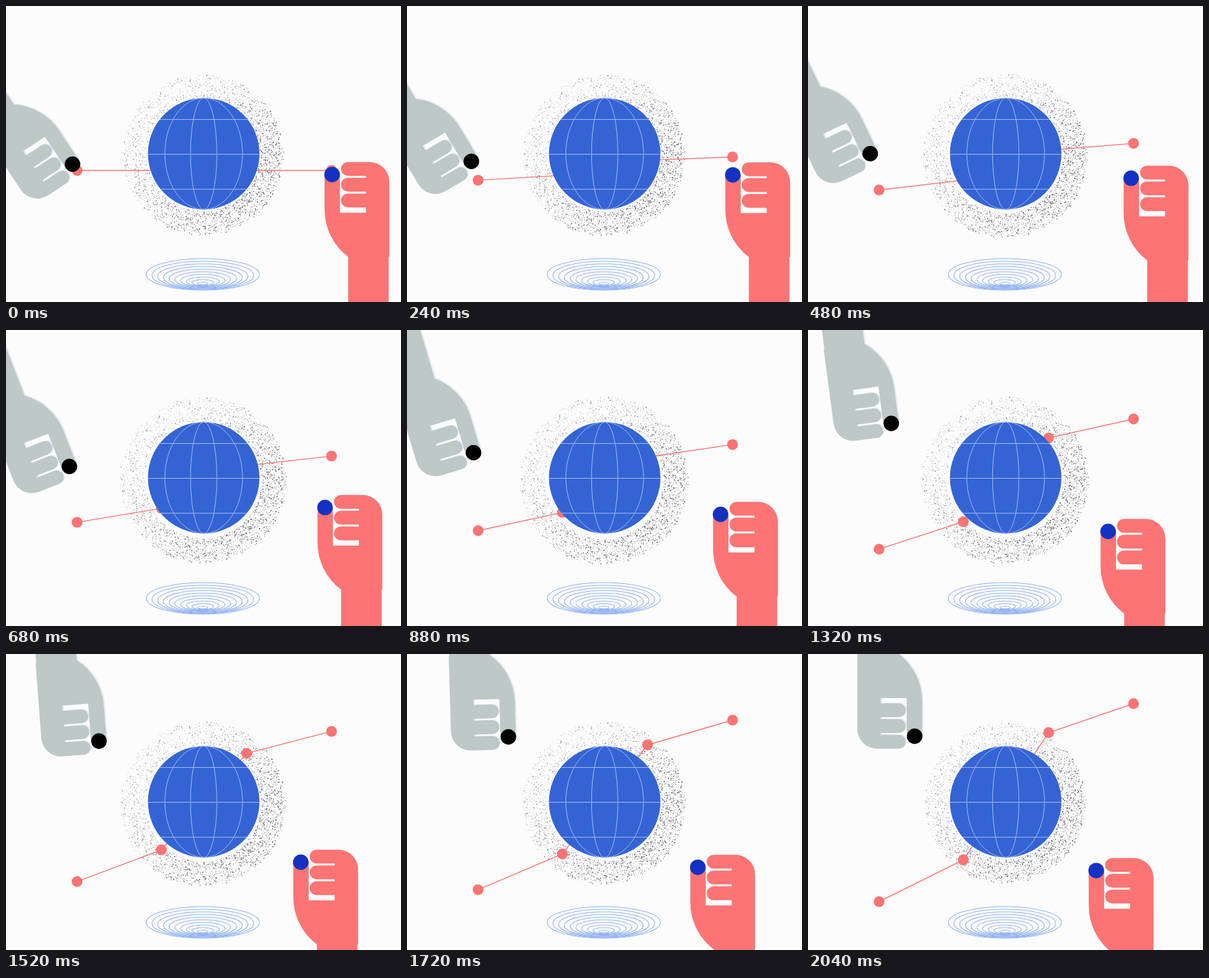
Animation of 600x450 px, one loop 2480 ms. Source, as an HTML page with a canvas:

```html
<!DOCTYPE html>
<html lang="en">
<head>
<meta charset="utf-8">
<title>Globe and hands</title>
<style>
html, body { margin: 0; width: 100%; height: 100%; overflow: hidden; background: #fcfcfc; }
canvas { display: block; }
</style>
</head>
<body>
<canvas id="stage" width="600" height="450"></canvas>
<script>
const ctx = document.getElementById('stage').getContext('2d');
const LOOP = 2480, MOVE = 2040, STEP = 40, DELAY = 140;
const RED = '#fc7474', BLUE = '#3464d4';

// Fist with forearm; the thumb nail is at the origin.
const finger = 'H24a10.5 10.5 0 0 0 0 21H51.5';
const hand = new Path2D(
  'M-11.4 0V53A90 90 0 0 0 24.4 125V420H86V125H87V11A30 30 0 0 0 57-19' +
  finger + 'v3' + finger + 'v3' + finger + 'V58H12V0Z');

// Grey hand poses: time, nail x, nail y, angle in degrees.
const poses = [
  [0, 101, 240.5, -33.4], [480, 94.5, 224.5, -25.6], [880, 101, 186.5, -16.6],
  [1120, 113, 159.5, -11.4], [1320, 126.5, 142, -7.5], [1720, 154, 126, -1.7],
  [2040, 162, 125, 0]
];

let seed = 7;
function rnd() {
  seed = (seed * 16807) % 2147483647;
  return seed / 2147483647;
}

// Dust is densest at the lower right and thin at the upper left.
const dust = [];
while (dust.length < 3000) {
  const a = rnd() * 2 * Math.PI;
  const weight = 0.76 + 0.24 * Math.cos(a - 0.7);
  if (rnd() > weight) continue;
  const r = 122 - 36 * rnd();
  const shade = Math.round(240 - (20 + 95 * rnd()) * weight);
  dust.push({
    x: r * Math.cos(a), y: r * Math.sin(a),
    size: rnd() < 0.28 * weight ? 2 : 1,
    color: `rgb(${shade},${shade},${shade})`
  });
}

function spline(t, col) {
  let i = 0;
  while (i < poses.length - 2 && t > poses[i + 1][0]) i++;
  const slope = k => k === 0 || k === poses.length - 1 ? 0 :
    (poses[k + 1][col] - poses[k - 1][col]) / (poses[k + 1][0] - poses[k - 1][0]);
  const [p, q] = [poses[i], poses[i + 1]];
  const d = q[0] - p[0], s = (t - p[0]) / d, s2 = s * s, s3 = s2 * s;
  return (2 * s3 - 3 * s2 + 1) * p[col] + (s3 - 2 * s2 + s) * d * slope(i) +
    (3 * s2 - 2 * s3) * q[col] + (s3 - s2) * d * slope(i + 1);
}

function disc(x, y, r, color) {
  ctx.fillStyle = color;
  ctx.beginPath();
  ctx.arc(x, y, r, 0, 2 * Math.PI);
  ctx.fill();
}

function ring(x, y, rx, ry) {
  ctx.beginPath();
  ctx.ellipse(x, y, rx, ry, 0, 0, 2 * Math.PI);
  ctx.stroke();
}

function fist(x, y, degrees, color) {
  ctx.save();
  ctx.translate(x, y);
  ctx.rotate(degrees * Math.PI / 180);
  ctx.fillStyle = color;
  ctx.fill(hand);
  ctx.restore();
}

function drawDust(u) {
  const pulse = Math.sin(Math.PI * u) ** 2;
  const scale = 1 + 0.048 * pulse, cy = 225.7 + 2.3 * pulse;
  for (const p of dust) {
    ctx.fillStyle = p.color;
    ctx.fillRect(Math.round(298.8 + p.x * scale), Math.round(cy + p.y * scale), p.size, p.size);
  }
}

function drawChart(u) {
  const g = u + 0.17 * u ** 4 * (1 - u);
  const points = [[108, 126.5], [236, 63], [365.5, -130.5], [494.5, -174.5]]
    .map(([x, rise]) => [x, 250 + rise * g]);
  ctx.strokeStyle = RED;
  ctx.lineWidth = 1.4;
  ctx.beginPath();
  points.forEach(p => ctx.lineTo(...p));
  ctx.stroke();
  points.forEach(p => disc(...p, 8.2, RED));
}

function drawGlobe() {
  const x = 300.3, y = 224.6, r = 84.7;
  disc(x, y, r, BLUE);
  ctx.strokeStyle = '#a3b9ee';
  ctx.lineWidth = 1;
  ring(x, y, 20, r);
  ring(x, y, 59, r);
  for (const lat of [172.5, 225.5, 278.5]) {
    const half = Math.sqrt(r * r - (lat - y) ** 2);
    ctx.beginPath();
    ctx.moveTo(x - half, lat);
    ctx.lineTo(x + half, lat);
    ctx.stroke();
  }
}

function drawRipples() {
  ctx.strokeStyle = '#92b2f2';
  ctx.lineWidth = 1.1;
  for (let i = 0; i < 10; i++) {
    const top = 384 + 4 * i, bottom = 432 - 0.9 * i;
    ring(299, (top + bottom) / 2, 86 - 8.7 * i, (bottom - top) / 2);
  }
}

function drawHands(t) {
  const [x, y, angle] = [1, 2, 3].map(col => spline(t, col));
  fist(x + 2, y - 1, 180 + angle, '#e8eaf4');
  fist(x, y, 180 + angle, '#bdc8c7');
  disc(x, y, 11.8, '#000');

  const s = Math.max(0, (t - DELAY) / (MOVE - DELAY));
  const e = (1 - Math.cos(Math.PI * s)) / 2;
  const rx = 495.3 - 57.5 * e, ry = 256.2 + 73 * e;
  fist(rx, ry, 0, RED);
  disc(rx, ry, 11.8, '#1432c2');
}

const start = performance.now();
function frame() {
  const now = (performance.now() - start) % LOOP;
  const t = Math.min(MOVE, Math.floor(now / STEP) * STEP);
  const u = t / MOVE;
  ctx.fillStyle = '#fcfcfc';
  ctx.fillRect(0, 0, 600, 450);
  drawDust(u);
  drawChart(u);
  drawGlobe();
  drawRipples();
  drawHands(t);
  requestAnimationFrame(frame);
}
frame();
</script>
</body>
</html>
```
